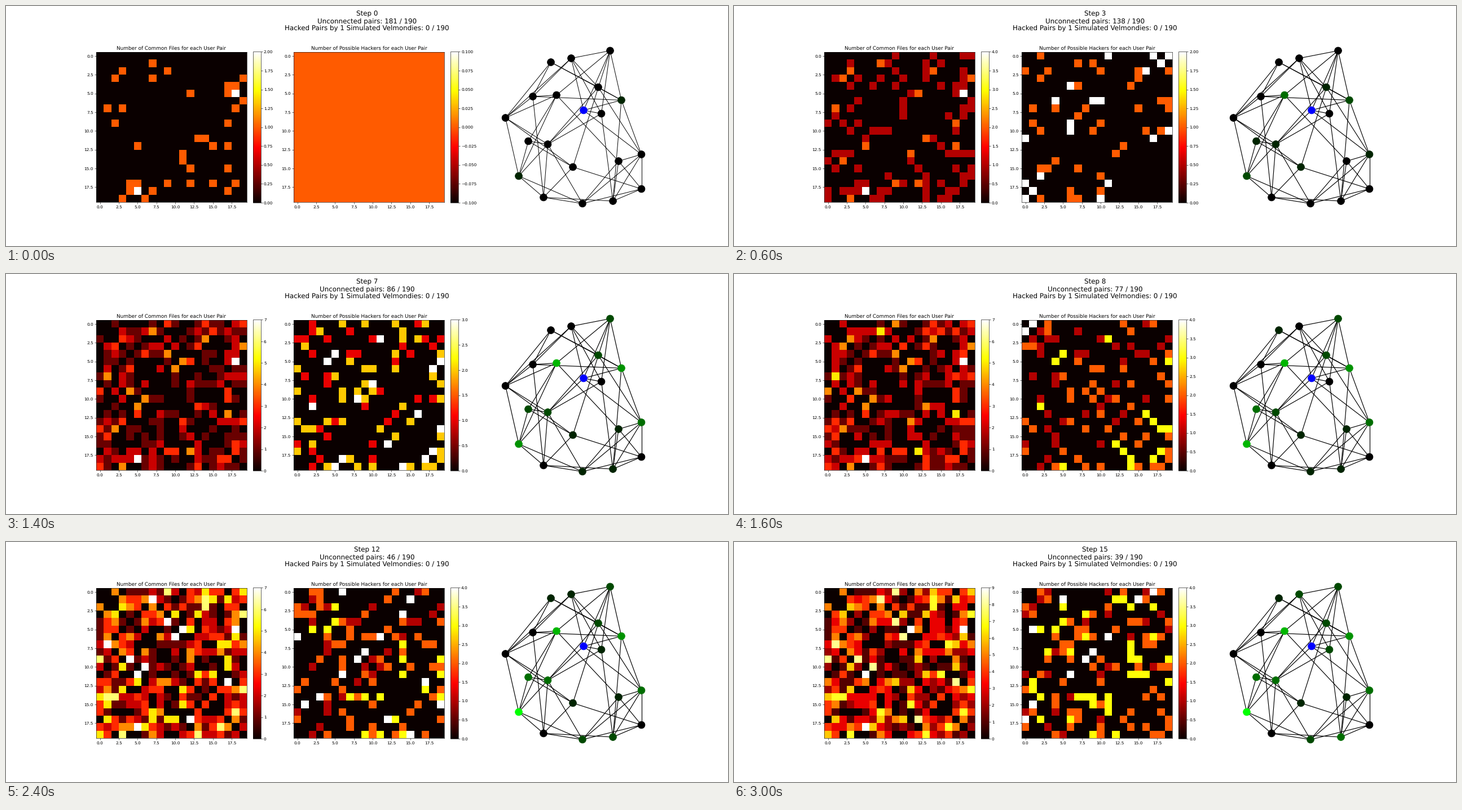
A matplotlib script for the animation above (3.2 s loop, 1280 by 427 pixels).

```python
import numpy as np
import matplotlib.pyplot as plt
from matplotlib.animation import FuncAnimation
from matplotlib.collections import LineCollection

USERS, STEPS = 20, 16
PAIRS = USERS * (USERS - 1) // 2
DPI = 160 / 3
ROWS, COLS = np.triu_indices(USERS, 1)

# node: x, y, first step it turns greener, steps per shade, number of shades
NODES = dict(
    A=(1071, 79.5, 5, 2, 2), B=(1002, 93, 9, 4, 2), C=(966, 100, 8, 1, 1),
    D=(1050, 144.5, 2, 5, 2), E=(934, 161, 0, 1, 0), F=(976, 158.5, 1, 1, 5),
    G=(1091, 167.5, 0, 2, 4), H=(1024, 185.5, 0, 1, 0),
    I=(1055.5, 191.5, 9, 5, 2), J=(885.5, 199, 0, 1, 0),
    K=(926, 240.5, 2, 3, 3), L=(960.5, 246, 2, 5, 3), M=(1005, 286.5, 2, 1, 1),
    N=(1086, 276, 6, 1, 1), O=(1126.5, 264, 2, 2, 3), P=(909, 302.5, 0, 2, 7),
    Q=(953, 340.5, 0, 1, 0), R=(1022, 351.5, 4, 7, 2), S=(1076, 347, 5, 4, 3),
    T=(1126.5, 325.5, 0, 1, 0))
LINKS = dict(A="BFGHIM", B="DEHIJ", C="DEGJ", D="GLO", E="FGJQ", F="JKNP",
             G="HOS", H="ILO", I="LS", J="LMP", K="LMP", L="PQR", M="QT",
             N="ORST", O="RST", P="QR", Q="RS", R="T", S="T")

rng = np.random.default_rng(11)


def keyed(step, steps, values):
    return int(np.interp(step, steps, values))


def unconnected(step):
    return keyed(step, [0, 3, 5, 7, 10, 12, 14],
                 [181, 138, 112, 86, 61, 46, 39])


def most_files(step):
    return keyed(step, [0, 3, 5, 7, 12, 14], [2, 4, 6, 7, 7, 9])


def most_hackers(step):
    return min(4, 1 + (step + 1) // 3) if step else 0


# each pair links up at some step, then shares more files at its own rate
shared = [max(19, PAIRS - unconnected(t)) for t in range(STEPS)]
order = rng.permutation(PAIRS)
birth = np.full(PAIRS, STEPS)
birth[order] = np.searchsorted(shared, np.arange(PAIRS), side="right")
rate = rng.gamma(2.5, 0.14, PAIRS)
start = np.ones(PAIRS)
busiest = order[0]
rate[busiest], start[busiest] = 0.8, 2


def common_files(step):
    t = min(step, 14)
    files = np.floor(start + (t - birth) * rate).clip(1, most_files(t))
    return np.where(birth <= t, files, 0)


def hacker_history():
    """Suspicions fade at random, and new ones keep the count rising."""
    level = np.zeros(PAIRS, int)
    history = [level]
    for t in range(1, STEPS):
        level = np.where(rng.random(PAIRS) < 0.18, 0, level)
        wanted = keyed(t, [0, 3, 7, 15], [0, 29, 50, 66])
        idle = rng.permutation(np.flatnonzero(level == 0))
        new = idle[:max(0, wanted - np.count_nonzero(level))]
        level[new] = 1 + rng.binomial(most_hackers(t) - 1, 0.45, len(new))
        history.append(level)
    return history


hackers_at = hacker_history()


def square(values):
    m = np.zeros((USERS, USERS))
    m[ROWS, COLS] = m[COLS, ROWS] = values
    return m


def heatmap(ax, title):
    im = ax.imshow(square(0), cmap="hot")
    ax.set_title(title)
    fig.colorbar(im, ax=ax, fraction=0.046, pad=0.04)
    return im


def node_color(name, step):
    if name == "H":
        return 0, 0, 1
    first, every, top = NODES[name][2:]
    return 0, np.clip((step - first) // every + 1, 0, top) / 7, 0


plt.rcParams["text.hinting"] = "none"
fig, axes = plt.subplots(1, 3, figsize=(24, 427 / DPI), dpi=DPI)
files = heatmap(axes[0], "Number of Common Files for each User Pair")
hackers = heatmap(axes[1], "Number of Possible Hackers for each User Pair")
axes[2].remove()

net = fig.add_axes([0, 0, 1, 1])
net.set(xlim=(0, 1280), ylim=(427, 0))
net.axis("off")
spots = {name: node[:2] for name, node in NODES.items()}
links = net.add_collection(LineCollection(
    [(spots[a], spots[b]) for a, ends in LINKS.items() for b in ends],
    colors="k"))
dots = net.scatter(*zip(*spots.values()), s=300, zorder=2)
title = fig.suptitle("", fontsize=16, linespacing=1.1)


def update(step):
    files.set_data(square(common_files(step)))
    files.set_clim(0, most_files(step))
    hackers.set_data(square(hackers_at[step]))
    top = most_hackers(step)
    hackers.set_clim(0 if top else -0.1, top or 0.1)
    links.set_linewidth(1.6 - 0.3 * 0.5 ** step)
    dots.set_color([node_color(name, step) for name in NODES])
    title.set_text(f"Step {step}\n"
                   f"Unconnected pairs: {unconnected(step)} / {PAIRS}\n"
                   f"Hacked Pairs by 1 Simulated Velmondies: 0 / {PAIRS}")
    return files, hackers, links, dots, title


anim = FuncAnimation(fig, update, frames=STEPS, interval=200, repeat=True,
                     repeat_delay=0, blit=False)
plt.show()
```
